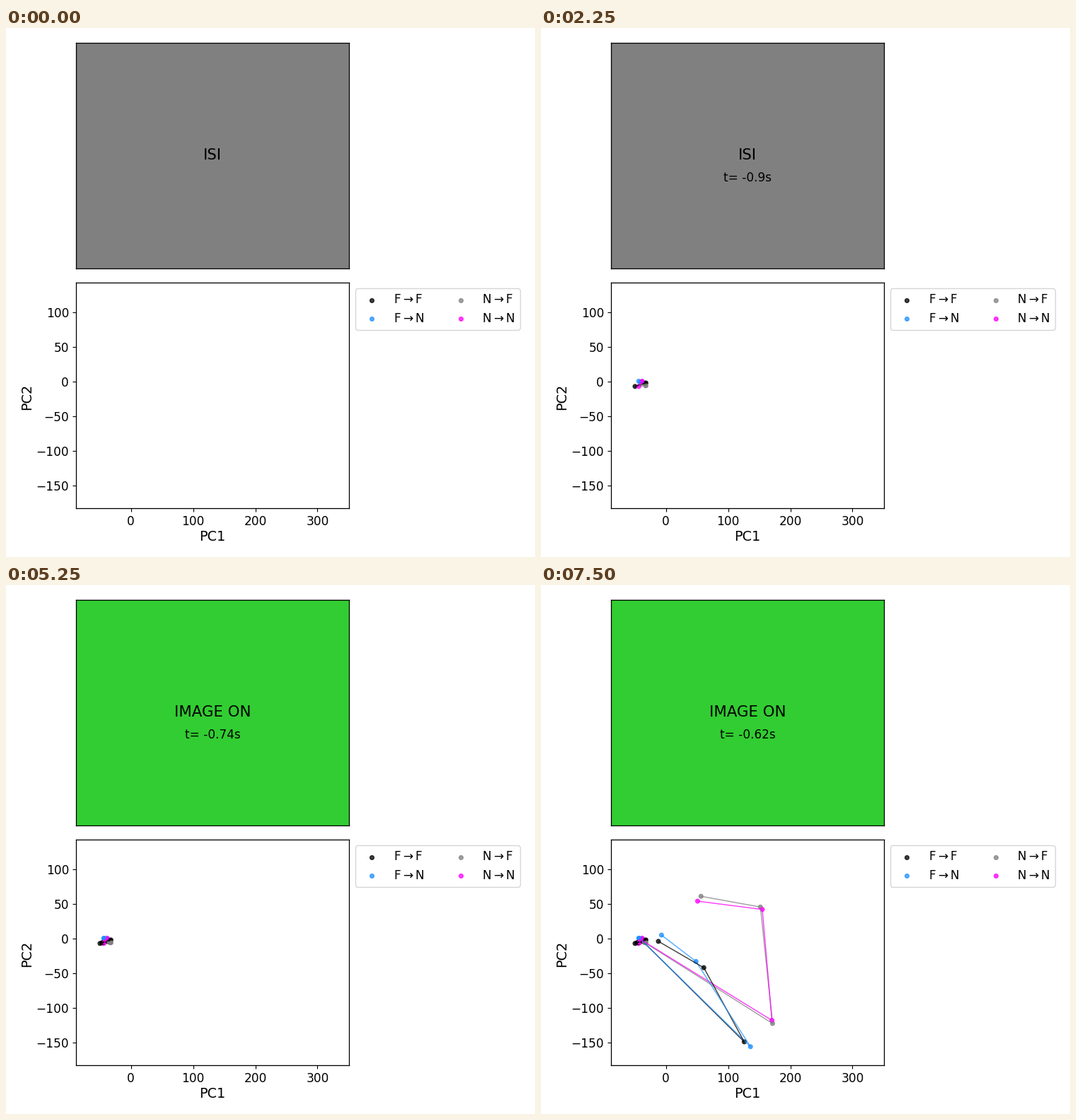
A matplotlib script for the animation above (8 s loop, 748 px wide and 748 px high).

```python
import numpy as np
import matplotlib.pyplot as plt
from matplotlib.animation import FuncAnimation
from matplotlib.collections import LineCollection
from matplotlib.colors import to_rgba

SIZE, DPI = 748, 88
INTERVAL, FRAMES, HOLD = 250, 32, 3
REST = 7           # resting steps before the response shows
DAMP = 0.82
ALPHA = 0.75

# colour, the two ends of the resting swing, then the response (PC1, PC2)
CONDITIONS = {
    "F$\\rightarrow$F": ("black", [(-32, -2), (-49.5, -7)],
                         [(126, -149), (61, -42), (-12, -4)]),
    "F$\\rightarrow$N": ("dodgerblue", [(-40, -1), (-43.5, 0.5)],
                         [(136, -156), (48.5, -33), (-7, 5)]),
    "N$\\rightarrow$F": ("gray", [(-32, -6), (-40, -4)],
                         [(171.5, -122.5), (152, 45.5), (56.5, 61)]),
    "N$\\rightarrow$N": ("magenta", [(-38, 0.5), (-43.5, -7)],
                         [(170.5, -118), (155, 42), (51, 54)]),
}


def pt(px):
    return px * 72 / DPI


def trajectory(swing, response):
    """Damped swing between two points, followed by the response."""
    a, b = np.array(swing, float)
    mid = (a + b) / 2
    k = np.arange(REST)[:, None]
    wave = (-1.0) ** k * DAMP ** np.maximum(k - 1, 0)
    return np.vstack([mid + (a - mid) * wave, response])


def add_axes(left, top, right, bottom):
    ax = fig.add_axes([left / SIZE, 1 - bottom / SIZE,
                       (right - left) / SIZE, (bottom - top) / SIZE])
    for spine in ax.spines.values():
        spine.set_linewidth(pt(1.3))
    return ax


plt.rcParams["font.family"] = "DejaVu Sans"
fig = plt.figure(figsize=(SIZE / DPI, SIZE / DPI), dpi=DPI, facecolor="white")

# Stimulus panel
screen = add_axes(99.1, 20.9, 485.1, 339.9)
screen.set(xticks=[], yticks=[])
centred = dict(ha="center", va="center", transform=screen.transAxes)
title = screen.text(0.5, 0.5, "", fontsize=pt(21.25), **centred)
clock = screen.text(0.5, 0.4, "", fontsize=pt(16.9), **centred)

# Trajectory panel
ax = add_axes(99.1, 359.9, 485.1, 678.9)
ax.set(xlim=(-88, 350.7), ylim=(-182.6, 142.9),
       xticks=range(0, 301, 100), yticks=range(-150, 101, 50))
ax.tick_params(labelsize=pt(17), length=pt(5), width=pt(1.15), pad=pt(5))
label = dict(fontsize=pt(19.3), ha="center", va="baseline",
             rotation_mode="anchor")
fig.text(292 / SIZE, 1 - 724.7 / SIZE, "PC1", **label)
fig.text(35.5 / SIZE, 1 - 521 / SIZE, "PC2", rotation=90, **label)

dot = dict(s=pt(5.7) ** 2, linewidths=pt(1.4))
for name, (color, *_) in CONDITIONS.items():
    ax.scatter([], [], color=color, label=name, alpha=ALPHA, **dot)
legend = ax.legend(loc="upper left", bbox_to_anchor=(1, 1), ncol=2,
                   fontsize=pt(17))
legend.get_frame().set_linewidth(pt(1.4))

# Step-major order: later steps are painted over earlier ones
colors = [to_rgba(c, ALPHA) for c, *_ in CONDITIONS.values()]
n = len(colors)
track = np.stack([trajectory(s, r) for _, s, r in CONDITIONS.values()], axis=1)
segments = np.stack([track[:-1], track[1:]], axis=2).reshape(-1, 2, 2)
points = track.reshape(-1, 2)

dots = ax.scatter([], [], **dot)
lines = LineCollection([], linewidths=pt(1.45), capstyle="projecting", zorder=2)
ax.add_collection(lines, autolim=False)


def update(frame):
    step = frame // HOLD
    on = step >= REST
    screen.set_facecolor("limegreen" if on else "gray")
    title.set_text("IMAGE ON" if on else "ISI")
    clock.set_text(f"t= {round(0.04 * step - 1.02, 2)}s" if step else "")

    dots.set_offsets(points[:n * step])
    dots.set_facecolor(colors * step)
    dots.set_edgecolor(colors * step)
    links = max(step - 1, 0)
    lines.set_segments(segments[:n * links])
    lines.set_color(colors * links)
    return dots, lines, title, clock


anim = FuncAnimation(fig, update, frames=FRAMES, interval=INTERVAL,
                     repeat=True, repeat_delay=0, blit=False)
plt.show()
```
